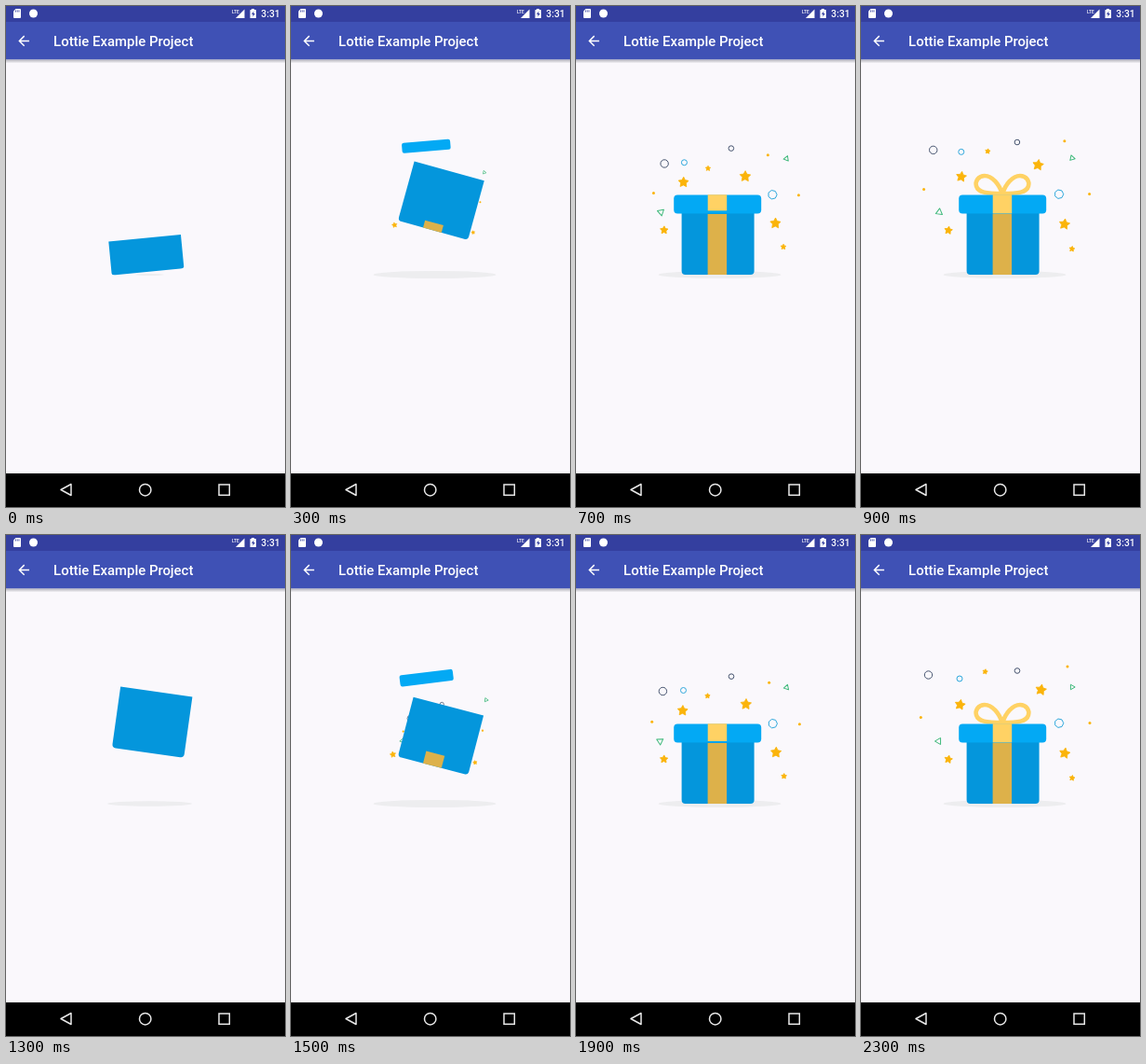
Write an HTML page that moves like this. It is 300 px wide and 537 px high and loops after 2.4 s.

```html
<!DOCTYPE html>
<html lang="en">
<head>
<meta charset="utf-8">
<title>Gift box</title>
<style>
html, body { margin: 0; width: 100%; height: 100%; overflow: hidden; background: #faf8fc; }
svg { display: block; width: 100vw; height: 100vh; }
text { font-family: Roboto, "Noto Sans", sans-serif; font-weight: 500; fill: #fff; }
</style>
</head>
<body>
<svg viewBox="0 0 300 537" preserveAspectRatio="none">
  <defs>
    <linearGradient id="barShade" x2="0" y2="1">
      <stop stop-color="#b4b4bd"/><stop offset="1" stop-color="#faf8fc"/>
    </linearGradient>
  </defs>
  <rect width="300" height="537" fill="#faf8fc"/>

  <ellipse id="shadow" rx="66" ry="4" fill="#ededef"/>
  <g id="confetti" stroke-linejoin="round"></g>
  <g id="box">
    <path d="M-39-66H39V-4Q39 0 35 0H-35Q-39 0-39-4Z" fill="#0496dc"/>
    <rect id="boxRibbon" x="-11" width="20.5" fill="#ddb14a"/>
  </g>
  <g id="bow" fill="none" stroke="#ffd264" stroke-width="4.6">
    <path pathLength="100" d="M152 202C149 191 141 182 133 182C126 182 122.500 188 124 193C126 200 135 201 152 201"/>
    <path pathLength="100" d="M152 202C155 191 163 182 171 182C178 182 181.500 188 180 193C178 200 169 201 152 201"/>
  </g>
  <g id="lid">
    <rect x="-47" y="-10" width="94" height="20" rx="4" fill="#03a9f4"/>
    <rect id="lidRibbon" x="-10.500" y="-10.300" width="20.500" fill="#ffd264"/>
  </g>

  <rect width="300" height="17" fill="#343f9f"/>
  <rect y="17" width="300" height="40.500" fill="#3f51b5"/>
  <rect y="57.500" width="300" height="4" fill="url(#barShade)"/>
  <g fill="#fff">
    <path d="M10.500 3H15Q16 3 16 4V12Q16 13 15 13H9Q8 13 8 12V5.500Z"/>
    <path d="M10.500 4.500V6.500M12.300 4.500V6.500M14 4.500V6.500" stroke="#343f9f" stroke-width=".8"/>
    <circle cx="29.500" cy="8" r="4.500"/>
    <path d="M256.500 3.500V13H247Z"/>
    <path d="M264 4V3H267V4H268.500Q269 4 269 4.500V13H262.500V4.500Q262.500 4 263 4Z"/>
    <path d="M266.300 5.500L264.100 9H265.500V11.500L267.800 8H266.300Z" fill="#343f9f"/>
    <path transform="translate(10.400 28.700) scale(.73)" d="M20 11H7.830l5.590-5.590L12 4l-8 8 8 8 1.410-1.410L7.830 13H20z"/>
  </g>
  <text x="243" y="7.500" font-size="4.800">LTE</text>
  <text x="274.300" y="12" font-size="10.300">3:31</text>
  <text x="51.100" y="43" font-size="14.900">Lottie Example Project</text>
  <rect y="501" width="300" height="36" fill="#000"/>
  <g fill="none" stroke="#e8e8e8" stroke-width="1.500">
    <path d="M59 518.500L70 512.500V524.500Z" stroke-linejoin="round"/>
    <circle cx="149.700" cy="518.700" r="6.200"/>
    <rect x="229" y="513" width="11.300" height="11.300"/>
  </g>
</svg>
<script>
const LOOP = 2400, STEP = 100, REPLAY = 1200, REPLAY_LEAD = 20;
const byId = id => document.getElementById(id);
const set = (el, attrs) => { for (const k in attrs) el.setAttribute(k, attrs[k]); };

// Progress from 0 to 1 between two times, and shapes for it.
const span = (t, from, to) => Math.min(1, Math.max(0, (t - from) / (to - from)));
const easeOut = u => 1 - (1 - u) ** 2;
const easeInOut = u => u * u * (3 - 2 * u);
const arc = u => Math.sin(Math.PI * u);

function polygon(n, r, inner = r) {
  const count = inner === r ? n : 2 * n;
  return Array.from({ length: count }, (_, i) => {
    const a = 2 * Math.PI * i / count, d = inner !== r && i % 2 ? inner : r;
    return (d * Math.cos(a)).toFixed(2) + ',' + (d * Math.sin(a)).toFixed(2);
  }).join(' ');
}

const ORANGE = '#fbb40a', BLUE = '#2fa8dc', NAVY = '#46546f', GREEN = '#3fb97b';
const BURST = { x: 156, y: 220, end: 960 };
const pieces = [];

// Each piece flies from the burst to its rest place; a higher snap gets there sooner.
function piece(tag, attrs, x, y, snap, rest = 0, spin = 0) {
  const el = document.createElementNS('http://www.w3.org/2000/svg', tag);
  set(el, attrs);
  byId('confetti').append(el);
  pieces.push({ el, x, y, snap, rest, spin });
}

const outline = color => ({ fill: 'none', stroke: color, 'stroke-width': 1 });
const ring = (r, color, ...flight) => piece('circle', { r, ...outline(color) }, ...flight);
const shape = (n, r, color, ...flight) => piece('polygon', { points: polygon(n, r), ...outline(color) }, ...flight);
const dot = (...flight) => piece('circle', { r: 1.5, fill: ORANGE }, ...flight);
const star = (r, ...flight) => piece('polygon',
  { points: polygon(5, r, r * .52), fill: ORANGE, stroke: ORANGE, 'stroke-width': .8 }, ...flight, -80, -30);

ring(4.2, NAVY, 72.5, 150, 1);
ring(3, BLUE, 106, 154, 1.2);
ring(2.8, NAVY, 168, 145.5, 1.8);
shape(7, 4.8, BLUE, 213, 201.7, 2.7);
shape(3, 3.2, GREEN, 227, 163, 3.5, 0, 190);
shape(3, 4.1, GREEN, 83.5, 221, 1.7, 180, -375);
dot(222, 141, 1.1);
dot(246, 201.5, 2);
dot(64.3, 195.5, 1.2);
star(4.4, 94, 240.5, 3.4);
star(5.9, 219, 234, 2);
star(3, 227, 260.5, 2.2);
star(5.7, 106.5, 182, 1.3);
star(2.8, 133.5, 146.5, .75);
star(6, 193.5, 166, .9);

function drawGift(t) {
  const hop = span(t, -5, 400);
  const boxY = 288 - 256 * hop * (1 - hop);
  const boxTurn = t < 480 ? 16 * Math.sin(Math.PI * (t - 48) / 432) : 0;
  const boxHeight = .55 + .45 * span(t, 0, 100);
  const boxRibbon = 65 * span(t, 270, 510);

  const drop = easeInOut(span(t, 250, 620));
  const lidTurn = -12.5 * arc(span(t, 260, 580));
  const lidScale = easeOut(span(t, 150, 600));

  set(byId('shadow'), { transform: `translate(154.5 288) scale(${span(t, -60, 200)})` });
  set(byId('box'), { transform: `translate(152.6 ${boxY}) rotate(${boxTurn}) scale(1 ${boxHeight})` });
  set(byId('boxRibbon'), { y: -boxRibbon, height: boxRibbon });
  set(byId('lid'), {
    transform: `translate(${145 + 7.2 * drop} ${147 + 65.5 * drop}) rotate(${lidTurn}) scale(${lidScale})`
  });
  set(byId('lidRibbon'), { height: 20.3 * span(t, 480, 740) });
  set(byId('bow'), { 'stroke-dasharray': `${100 * span(t, 740, 890)} 200` });
}

function drawConfetti(t) {
  const ahead = 1 - span(t, 0, BURST.end);
  const size = easeOut(span(t, 200, 440));
  for (const { el, x, y, snap, rest, spin } of pieces) {
    const left = ahead ** snap;
    const px = x + (BURST.x - x) * left, py = y + (BURST.y - y) * left;
    set(el, { transform: `translate(${px} ${py}) rotate(${rest + spin * ahead}) scale(${size})` });
  }
}

const start = performance.now();
function tick() {
  const clock = Math.floor(((performance.now() - start) % LOOP) / STEP) * STEP;
  const t = clock < REPLAY ? clock : clock - REPLAY + REPLAY_LEAD;
  drawGift(t);
  drawConfetti(t);
  requestAnimationFrame(tick);
}
tick();
</script>
</body>
</html>
```
